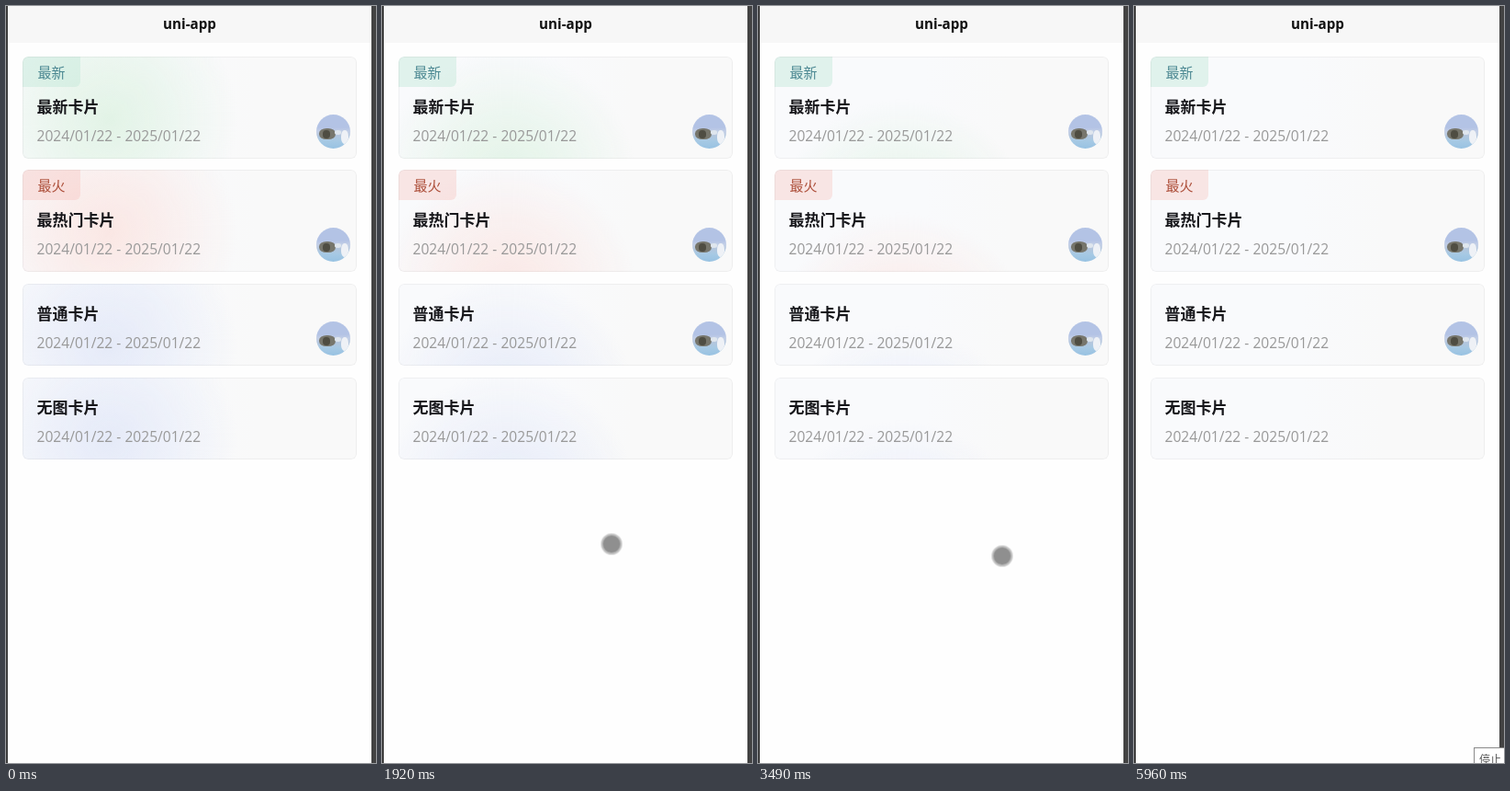
Recreate the animation shown at these times as an HTML page. Size 403 by 823 pixels, loop 6030 ms.

```html
<!DOCTYPE html>
<html lang="zh-CN">
<head>
<meta charset="utf-8">
<title>uni-app</title>
<style>
  :root { --loop: 6030ms; }
  html, body { margin: 0; width: 100%; height: 100%; overflow: hidden; }
  body { position: relative; background: #fefefe; font-family: "Noto Sans CJK SC", "Noto Sans CJK", sans-serif; }
  body *, .card::after { position: absolute; box-sizing: border-box; white-space: nowrap; }

  header {
    inset: 0 0 auto; height: 40px; padding-right: 3px; background: #f7f7f7;
    font: 700 15.2px/39px "Open Sans", sans-serif; color: #111; text-align: center;
  }
  .edge { top: 0; bottom: 0; background: #3d3d3d; }
  .left { left: 0; width: 2px; }
  .right { left: 398px; width: 5px; background: #424242; }

  .card {
    left: 18px; width: 364px; top: var(--top); height: var(--h);
    border-radius: 6px; overflow: hidden;
    background: linear-gradient(90deg, #f9fafc 45%, #f9f9f9 70%);
  }
  .card::after { content: ""; inset: 0; border-radius: 6px; box-shadow: inset 0 0 0 1px rgba(0, 0, 0, .045); }
  .green { --tint: 226, 243, 230; --tag: rgba(190, 230, 214, .42); --ink: #4a8791; }
  .red { --tint: 250, 231, 228; --tag: rgba(246, 190, 186, .36); --ink: #ad4f3a; }
  .blue { --tint: 229, 234, 248; }

  .glow {
    left: -46px; top: -72px; width: 280px; height: 280px;
    background: radial-gradient(closest-side, rgb(var(--tint)), rgba(var(--tint), .55) 50%, rgba(var(--tint), 0));
    animation: drift var(--loop) linear infinite;
  }
  @keyframes drift { to { transform: translate(78px, 204px); } }

  .tag {
    left: 0; top: 0; width: 63px; height: 33px; border-radius: 6px 0 6px 0;
    background: var(--tag); color: var(--ink); font-size: 15px; line-height: 33px; text-align: center;
  }
  h2 { left: 15.5px; bottom: 45px; margin: 0; font-size: 17px; font-weight: 700; line-height: 24px; color: #16161a; }
  time { left: 15.5px; bottom: 15px; font: 15.6px/20px "Open Sans", sans-serif; color: #999; }

  .photo {
    left: 320px; bottom: 11.5px; width: 37px; height: 37px; border-radius: 50%; overflow: hidden;
    background: linear-gradient(#b3c3e5 38%, #c3cfe6 50%, #b4c6dd 62%, #a6c9e4 78%, #98c2e2);
  }
  .photo i { border-radius: 45%; }
  .photo i:nth-child(1) { left: 3px; top: 15px; width: 18px; height: 12px; background: #77766c; }
  .photo i:nth-child(2) { left: 7px; top: 17px; width: 8px; height: 9px; background: #4f4d42; }
  .photo i:nth-child(3) { left: 27px; top: 17px; width: 8px; height: 15px; background: #eef1f6; }
  .photo i:nth-child(4) { left: 20px; top: 17px; width: 7px; height: 5px; background: #dfe6ee; }

  .cursor {
    left: -11.5px; top: -11.5px; width: 23px; height: 23px; border-radius: 50%;
    background: #8f8f8f; border: 2px solid #c2c2c2; visibility: hidden;
    animation: roam var(--loop) linear infinite, show var(--loop) step-end infinite;
  }
  /* quick moves jump, slow ones glide */
  @keyframes roam {
    0% { transform: translate(333.5px, 778.5px); animation-timing-function: step-end; }
    2.3% { transform: translate(308px, 715px); animation-timing-function: step-end; }
    3.45% { transform: translate(284px, 655px); animation-timing-function: step-end; }
    4.6% { transform: translate(264px, 615px); }
    10.1% { transform: translate(251.5px, 596px); }
    12.4% { transform: translate(251.5px, 592.5px); }
    20.4%, 31.8% { transform: translate(249.5px, 584.5px); }
    36%, 52.2% { transform: translate(252.5px, 584.5px); }
    57.9% { transform: translate(265.5px, 597.5px); }
    61.4% { transform: translate(268px, 597.5px); }
    71.4% { transform: translate(268.5px, 602.5px); animation-timing-function: step-end; }
    72.75% { transform: translate(283.5px, 644.5px); animation-timing-function: step-end; }
    73.95% { transform: translate(307px, 720px); animation-timing-function: step-end; }
    75.1%, 100% { transform: translate(330.5px, 796.5px); }
  }
  @keyframes show {
    0% { visibility: hidden; }
    1.15% { visibility: visible; }
    76.2% { visibility: hidden; }
  }

  .tip {
    left: 370px; top: 806px; width: 40px; height: 24px; padding-left: 5px;
    border: 1px solid #8a8a8a; background: #fff; color: #555; font-size: 12px; line-height: 24px;
    visibility: hidden; animation: hint var(--loop) step-end infinite;
  }
  @keyframes hint {
    0% { visibility: hidden; }
    97.6% { visibility: visible; }
  }
</style>
</head>
<body>
  <header>uni-app</header>

  <section class="card green" style="--top: 55px; --h: 111px">
    <div class="glow"></div>
    <span class="tag">最新</span>
    <h2>最新卡片</h2>
    <time>2024/01/22 - 2025/01/22</time>
    <div class="photo"><i></i><i></i><i></i><i></i></div>
  </section>

  <section class="card red" style="--top: 178px; --h: 111px">
    <div class="glow"></div>
    <span class="tag">最火</span>
    <h2>最热门卡片</h2>
    <time>2024/01/22 - 2025/01/22</time>
    <div class="photo"><i></i><i></i><i></i><i></i></div>
  </section>

  <section class="card blue" style="--top: 302px; --h: 89px">
    <div class="glow"></div>
    <h2>普通卡片</h2>
    <time>2024/01/22 - 2025/01/22</time>
    <div class="photo"><i></i><i></i><i></i><i></i></div>
  </section>

  <section class="card blue" style="--top: 404px; --h: 89px">
    <div class="glow"></div>
    <h2>无图卡片</h2>
    <time>2024/01/22 - 2025/01/22</time>
  </section>

  <div class="cursor"></div>
  <div class="edge left"></div>
  <div class="edge right"></div>
  <div class="tip">停止</div>
</body>
</html>
```
